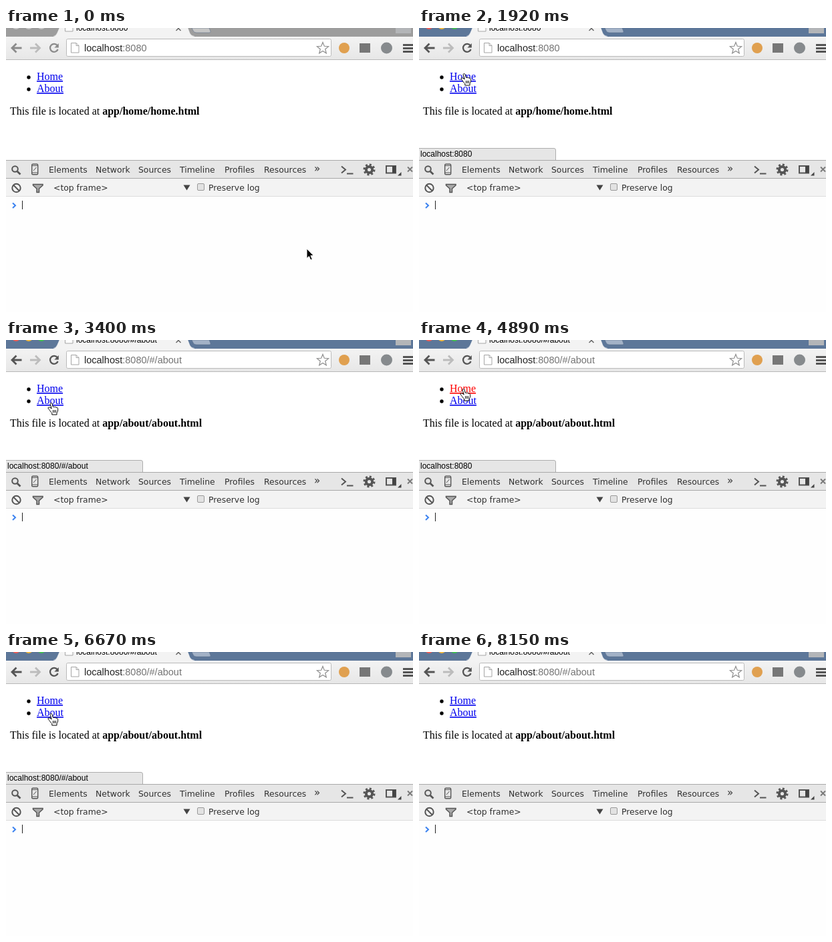
Write an HTML page that moves like this. It is 609 by 426 pixels and loops after 8.89 s.

```html
<!DOCTYPE html>
<html lang="en">
<head>
<meta charset="utf-8">
<title>Route demo</title>
<style>
  html, body { margin: 0; width: 100%; height: 100%; overflow: hidden; background: #fefefe; }
  svg { display: block; width: 609px; height: 426px; }
  text { white-space: pre; }
  .page { font: 16px "Liberation Serif", serif; }
  .page .link { fill: #00e; text-decoration: underline; }
  .page .link.pressed { fill: #f00; }
  .bold { font-weight: bold; }
  .tools { font: 12.4px "DejaVu Sans", sans-serif; fill: #303030; }
  .small { font: 12px "Liberation Sans", sans-serif; }
  .url { font: 14.5px "Liberation Sans", sans-serif; fill: #747474; }
  .line { fill: none; stroke: #555; stroke-width: 2; }
</style>
</head>
<body>
<svg viewBox="0 0 609 426" xmlns="http://www.w3.org/2000/svg">
  <defs>
    <linearGradient id="bar" x2="0" y2="1">
      <stop stop-color="#f3f3f3"/><stop offset="1" stop-color="#e7e7e7"/>
    </linearGradient>
    <path id="left" d="M15.5 23.5L9 30l6.500 6.500M9.500 30H23.500" fill="none" stroke-width="2.800"/>
    <path id="sheet" d="M.5 .5h7.500l4 4v10.500H.5zM8 .5v4h4" fill="#fff" stroke="#a5a5a5"/>
  </defs>

  <!-- Tab strip -->
  <rect id="strip" width="609" height="13"/>
  <g id="lights">
    <circle cx="15" cy="-4" r="6"/><circle cx="34" cy="-4" r="6"/><circle cx="53" cy="-4" r="6"/>
  </g>
  <path d="M71 13Q75 12 77 7L80 0H272L275 8Q277 12 282 13Z" fill="#f3f3f3"/>
  <path d="M71 12.500Q75 12 77 7L80 0M272 0L275 8Q277 12 282 12.500" fill="none" stroke="#fff" stroke-opacity=".5"/>
  <path id="newTab" d="M278 0H304L306 5Q306.500 7 304 7H285Q281 7 280 4Z" stroke="#566a86" stroke-opacity=".5"/>
  <use href="#sheet" x="88" y="-10"/>
  <text id="title" class="small" x="105" y="4"/>
  <path class="line" style="stroke:#666;stroke-width:1.500" d="M254.500 -3l7 7M261.500 -3l-7 7"/>
  <rect x="583" width="23" height="8" fill="#b3b5b8"/>

  <!-- Toolbar -->
  <rect y="13" width="609" height="34" fill="url(#bar)"/>
  <path d="M0 47.500H609" stroke="#b8b8b8"/>
  <g id="nav">
    <use href="#left"/>
    <path d="M76.800 26.200A6 6 0 1 0 77.600 32" fill="none" stroke-width="2.300"/>
    <path d="M78.800 23v6.500h-6.500z" stroke="none"/>
  </g>
  <use href="#left" transform="matrix(-1 0 0 1 59.500 0)" stroke="#bcbcbc"/>
  <rect x="90.500" y="16.500" width="396" height="26" rx="2" fill="#fff" stroke="#bababa"/>
  <use href="#sheet" x="97" y="22"/>
  <text class="url" x="117" y="35"><tspan fill="#222">localhost</tspan><tspan id="path"></tspan></text>
  <path id="star" fill="#fff" stroke="#8f8f8f" stroke-width="1.200"/>
  <circle cx="506" cy="30" r="8" fill="#e0a050"/>
  <rect x="529" y="23" width="16" height="14" fill="#777"/>
  <circle cx="569.500" cy="30" r="8.500" fill="#868a8d"/>
  <path class="line" style="stroke-width:2.800" d="M594 25.500H609M594 30.500H609M594 35.500H609"/>

  <!-- Page -->
  <rect y="48" width="609" height="150" fill="#fff"/>
  <g class="page">
    <circle cx="34" cy="74" r="2.700"/><circle cx="34" cy="92" r="2.700"/>
    <text id="home" class="link" x="46" y="78">Home</text>
    <text id="about" class="link" x="46" y="96">About</text>
    <text x="6" y="130">This file is located at <tspan id="file" class="bold"></tspan></text>
  </g>
  <g id="status">
    <path d="M-1 180.500H202Q204.500 180.500 204.500 183V199H-1Z" fill="#e6e6e6" stroke="#adadad"/>
    <text id="target" class="small" x="2" y="193"/>
  </g>

  <!-- Developer tools -->
  <rect y="198" width="609" height="28" fill="#e6e6e6"/>
  <rect y="226" width="609" height="27" fill="#f3f3f3"/>
  <rect y="253" width="609" height="173" fill="#fefefe"/>
  <path d="M0 198.500H609M0 225.500H609" stroke="#a8a8a8"/>
  <path d="M0 252.500H609" stroke="#dcdcdc"/>
  <g id="tabs" class="tools"></g>
  <g class="tools">
    <text x="461" y="216" font-size="15">»</text>
    <text x="71" y="244">&lt;top frame&gt;</text>
    <text x="303" y="244">Preserve log</text>
  </g>
  <circle class="line" cx="13.500" cy="211.500" r="4.300"/>
  <path class="line" style="stroke-width:2.800" d="M16.800 215l4.700 4.500"/>
  <rect class="line" style="stroke-width:1.400" x="38.700" y="204.200" width="9" height="15.500" rx="1.500"/>
  <path class="line" style="stroke-width:1" d="M39 206.500h8.500M39 217h8.500M41 214l4.500-5"/>
  <path class="line" d="M502 207.500l6 5-6 5M510 218.500h9.500"/>
  <circle class="line" cx="543.500" cy="212.500" r="4.600" stroke-width="4" style="stroke-width:4"/>
  <circle class="line" cx="543.500" cy="212.500" r="7.500" style="stroke-width:3;stroke-dasharray:2.950"/>
  <rect class="line" x="569" y="207" width="14" height="10.500"/>
  <path d="M578 207h5v10.500h-5zM591.500 216v5.500h-5.500z" fill="#444"/>
  <path class="line" style="stroke:#777;stroke-width:1.800" d="M601 208.500l7 7M608 208.500l-7 7"/>
  <circle class="line" cx="15.500" cy="240" r="6.200"/>
  <path class="line" d="M11 235.500l9 9"/>
  <path d="M40.500 234.500h14.500v1.500l-5.500 5v5.500h-3.500v-5.500l-5.500-5z" fill="#aaa" stroke="#555" stroke-width="1.500"/>
  <path d="M265.500 235.500h10l-5 8z" fill="#444"/>
  <rect x="286.500" y="233.500" width="10" height="10" rx="1.500" fill="#e2e2e2" stroke="#999"/>
  <path d="M10 262.500l4 3.800-4 3.800" fill="none" stroke="#3b82f0" stroke-width="2"/>
  <path d="M24.500 259v13" stroke="#222"/>

  <!-- Pointers -->
  <path id="arrow" d="M0 0V14.500L3.400 11.500L5.800 17L8.300 16L5.900 10.500H10.300Z" fill="#000" stroke="#fff"/>
  <g id="hand" stroke="#000" stroke-linejoin="round">
    <path d="M1.500 .5C.3 .5 0 1.300 .3 2.500L2.200 9C.8 7.300-1.500 6.300-2.800 7.300C-3.800 8.300-1.600 9.800-.6 11.500C.6 13.700 1.800 14.500 2.800 15.500V18H10V15.500C11.600 13 12 11 11.500 8.500C11.200 6.900 9.700 6.700 9.100 7.600C8.600 6 6.700 5.800 6.200 7C5.700 5.900 4.600 5.700 4.200 6.300L3.100 1.700Q2.700 .5 1.500 .5Z" fill="#fff"/>
    <path d="M4.500 11v4M6.500 11v4M8.500 11v4" stroke-width=".9"/>
  </g>
</svg>
<script>
const LOOP = 8890;
const HOME = 'home', ABOUT = 'about';
const $ = id => document.getElementById(id);
const set = (id, attrs) => {
  for (const key in attrs) $(id).setAttribute(key, attrs[key]);
};
const show = (id, on) => set(id, { display: on ? 'inline' : 'none' });

const steps = [
  [0, 450, 331, '', false, HOME],
  [740, 285, 214, '', false, HOME],
  [890, 70, 110, '', false, HOME],
  [1030, 66, 79, HOME, false, HOME],
  [1180, 65, 74, HOME, false, HOME],
  [1480, 66, 70, HOME, false, HOME],
  [1770, 66, 68, HOME, false, HOME],
  [2070, 66, 68, HOME, true, HOME],
  [2220, 66, 68, HOME, false, HOME],
  [2510, 65, 84, ABOUT, false, HOME],
  [2660, 66, 94, ABOUT, false, HOME],
  [3100, 66, 94, ABOUT, true, HOME],
  [3250, 66, 94, ABOUT, false, ABOUT],
  [4140, 66, 88, ABOUT, false, ABOUT],
  [4290, 65, 78, HOME, false, ABOUT],
  [4440, 65, 73, HOME, false, ABOUT],
  [4890, 65, 73, HOME, true, ABOUT],
  [5040, 65, 73, HOME, false, HOME],
  [5790, 65, 84, ABOUT, false, HOME],
  [5940, 66, 92, ABOUT, false, HOME],
  [6230, 66, 92, ABOUT, true, HOME],
  [6520, 66, 92, ABOUT, false, ABOUT],
  [7710, 90, 150, '', false, ABOUT],
  [7860, 150, 301, '', false, ABOUT],
  [8010, -50, -50, '', false, ABOUT]
];

const tabs = { Elements: 64, Network: 134, Sources: 198, Timeline: 260, Profiles: 327, Resources: 386 };
for (const name in tabs) {
  const label = document.createElementNS('http://www.w3.org/2000/svg', 'text');
  label.textContent = name;
  label.setAttribute('x', tabs[name]);
  label.setAttribute('y', 217);
  $('tabs').append(label);
}

const starPoints = Array.from({ length: 10 }, (_, i) => {
  const a = i * Math.PI / 5 - Math.PI / 2, r = i % 2 ? 3.9 : 9;
  return (474 + r * Math.cos(a)).toFixed(1) + ' ' + (30.5 + r * Math.sin(a)).toFixed(1);
});
set('star', { d: 'M' + starPoints.join('L') + 'Z' });

const portPath = route => ':8080' + (route === ABOUT ? '/#/about' : '');

function setActive(active) {
  set('strip', { fill: active ? '#5d7799' : '#9d9d9d' });
  set('newTab', { fill: active ? '#a3b2c7' : '#c6c6c6' });
  const ink = active ? '#555' : '#8b8b8b';
  set('nav', { stroke: ink, fill: ink });
  const colors = active ? ['#f25a52', '#f3b93a', '#3fc14c'] : Array(3).fill('#c9c9c9');
  [...$('lights').children].forEach((dot, i) => dot.setAttribute('fill', colors[i]));
}

function render(t) {
  const [, x, y, link, pressed, route] = steps.findLast(step => step[0] <= t);
  setActive(t >= 300);
  $('title').textContent = 'localhost' + portPath(route);
  $('path').textContent = portPath(route);
  $('file').textContent = `app/${route}/${route}.html`;
  $('target').textContent = 'localhost' + portPath(link);
  for (const id of [HOME, ABOUT]) $(id).classList.toggle('pressed', pressed && link === id);
  show('status', link);
  show('hand', link);
  show('arrow', !link);
  set(link ? 'hand' : 'arrow', { transform: `translate(${x} ${y})` });
}

const start = performance.now();
function tick() {
  render((performance.now() - start) % LOOP);
  requestAnimationFrame(tick);
}
tick();
</script>
</body>
</html>
```
